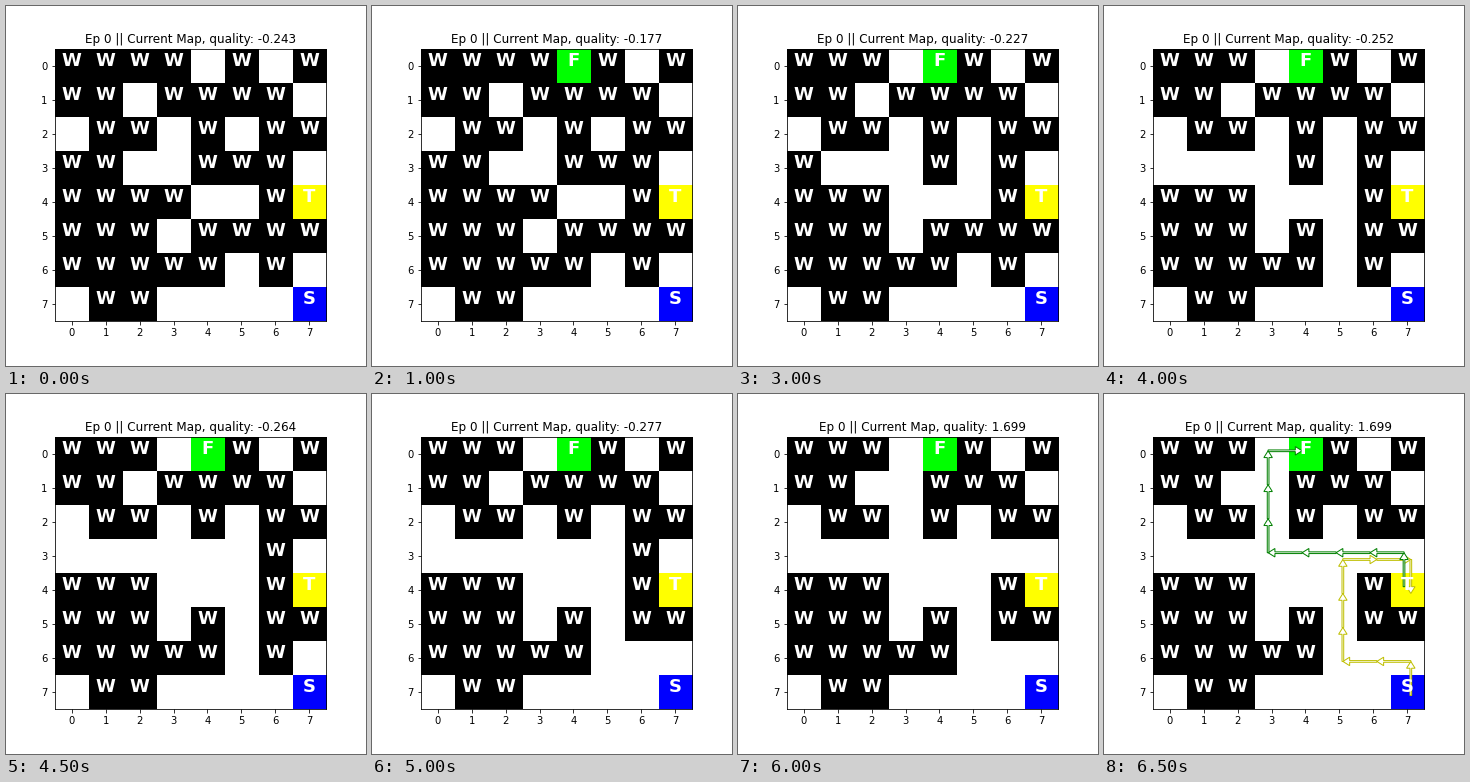
A matplotlib script that plays this animation: 360x360 px, repeating every 8 s.

```python
import matplotlib.pyplot as plt
import numpy as np
from matplotlib.animation import FuncAnimation
from matplotlib.colors import ListedColormap

STEP_MS = 500
FRAMES = 16
SYMBOLS = ".WFTS"
COLORS = ListedColormap(["white", "black", "lime", "yellow", "blue"])

START = [
    "WWWW.W.W",
    "WW.WWWW.",
    ".WW.W.WW",
    "WW..WWW.",
    "WWWW..WT",
    "WWW.WWWW",
    "WWWWW.W.",
    ".WW....S",
]

# One edit per step: row, column, new symbol, resulting quality
EDITS = [
    (0, 4, "F", "-0.177"),
    (4, 3, ".", "-0.189"),
    (0, 3, ".", "-0.202"),
    (3, 1, ".", "-0.214"),
    (3, 5, ".", "-0.227"),
    (5, 5, ".", "-0.239"),
    (3, 0, ".", "-0.252"),
    (3, 4, ".", "-0.264"),
    (6, 6, ".", "-0.277"),
    (1, 3, ".", "0.711"),
    (3, 6, ".", "1.699"),
]
FIRST_EDIT = 2
ROUTE_FRAME = 13

# Routes as (column, row) corners
TO_TREASURE = [(7, 7), (7, 6), (5, 6), (5, 3), (7, 3), (7, 4)]
TO_FINISH = [(7, 4), (7, 3), (3, 3), (3, 0), (4, 0)]

fig, ax = plt.subplots(figsize=(5, 5), dpi=72)
fig.subplots_adjust(left=0.125, right=0.9, bottom=0.125, top=0.88)


def board_at(frame):
    board = [list(row) for row in START]
    quality = "-0.243"
    for row, col, symbol, quality_now in EDITS[:max(0, frame - FIRST_EDIT + 1)]:
        board[row][col] = symbol
        quality = quality_now
    return board, quality


def draw_route(corners, color, shift):
    for (x0, y0), (x1, y1) in zip(corners, corners[1:]):
        dx, dy = int(np.sign(x1 - x0)), int(np.sign(y1 - y0))
        for i in range(abs(x1 - x0) + abs(y1 - y0)):
            ax.arrow(x0 + i * dx + shift, y0 + i * dy + shift, dx, dy,
                     width=0.05, head_width=0.25, head_length=0.2,
                     length_includes_head=True, fc="white", ec=color)


def draw(frame):
    ax.clear()
    board, quality = board_at(frame)
    codes = [[SYMBOLS.index(s) for s in row] for row in board]
    ax.imshow(codes, cmap=COLORS, vmin=0, vmax=4, interpolation="nearest")
    for (row, col), symbol in np.ndenumerate(np.array(board)):
        if symbol != ".":
            ax.text(col, row, symbol, color="white", size=18,
                    weight="bold", ha="center")
    if frame >= ROUTE_FRAME:
        draw_route(TO_TREASURE, "y", 0.1)
        draw_route(TO_FINISH, "g", -0.1)
    ax.set_xlim(-0.5, 7.5)
    ax.set_ylim(7.5, -0.5)
    ax.set_xticks(range(8))
    ax.set_yticks(range(8))
    ax.set_title(f"Ep 0 || Current Map, quality: {quality}")
    return []


anim = FuncAnimation(fig, draw, frames=FRAMES, init_func=lambda: [],
                     interval=STEP_MS, repeat=True, repeat_delay=0)
plt.show()
```
